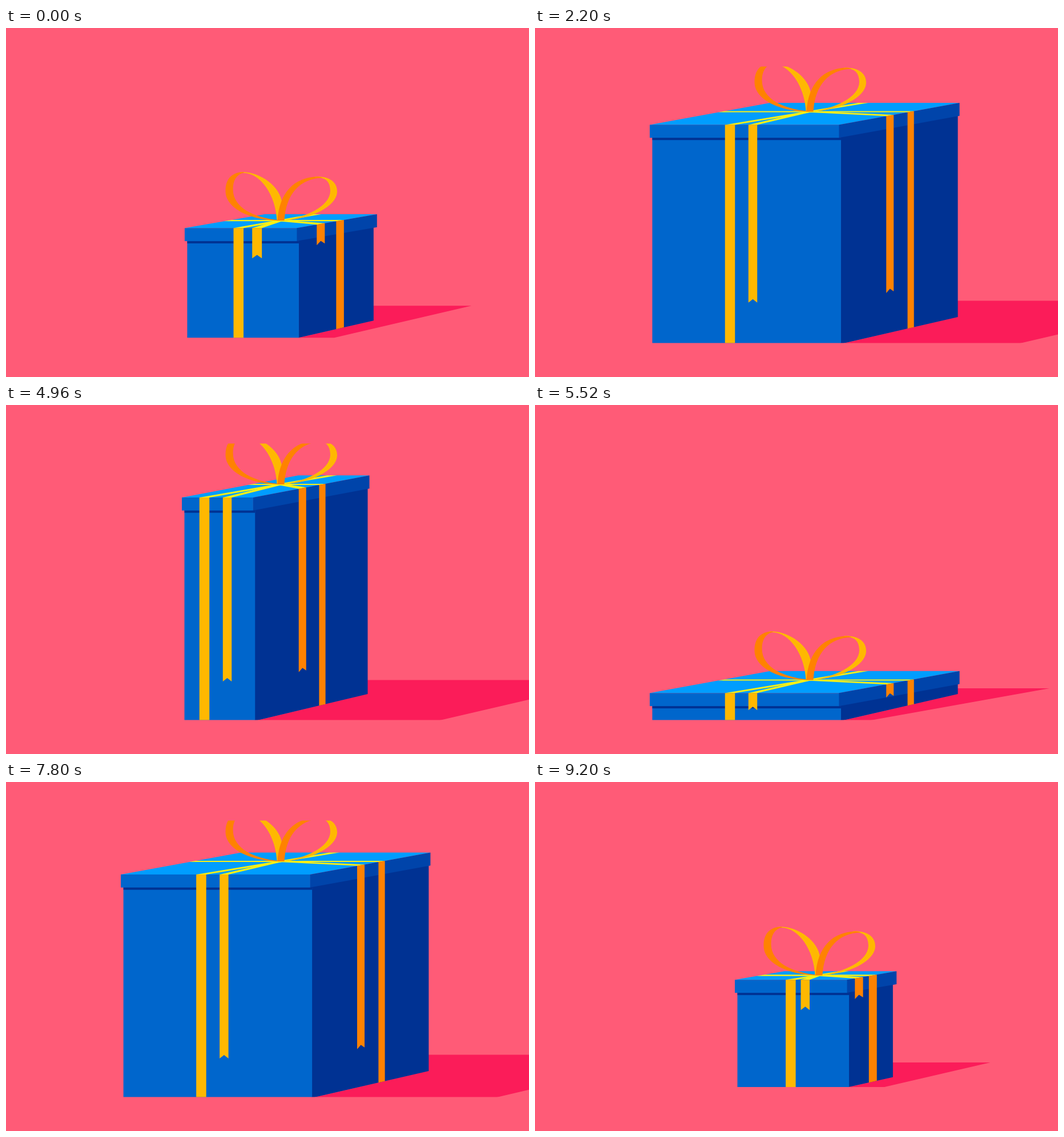
An HTML page with a canvas that plays this animation: 916x611 px, repeating every 9.24 s.

```html
<!DOCTYPE html>
<html lang="en">
<head>
<meta charset="utf-8">
<title>Gift box</title>
<style>
html, body { margin: 0; width: 100%; height: 100%; overflow: hidden; background: #ff5b77; }
canvas { display: block; width: 916px; height: 611px; }
</style>
</head>
<body>
<canvas id="stage" width="916" height="611"></canvas>
<script>
const ctx = document.getElementById('stage').getContext('2d');
const LOOP = 9240, STEP = 40;
const BG = '#ff5b77', SHADE = '#fb1c59', FRONT = '#0066cc', SIDE = '#003293',
  TOP = '#009dff', RIM = '#0044aa', GOLD = '#ffb800', ORANGE = '#ff8200', LEMON = '#f8f016';
const LID = 22.8;

// A pose is a width, a height from 0 to 9 and a depth
const WIDTH = { n: 64.5, m: 195.5, w: 330.5 };
const DEPTH = { s: 8, m: 30, d: 47 };
const poses = ('m4m m9m n9m n9d w9d w6d n0d n0s w0s w8s ' +
  'w9d n0d w0d w9s n9s n0s n9s w9d w2d w0s').split(' ')
  .map(p => [WIDTH[p[0]], +p[1], DEPTH[p[2]]]);

const clamp = u => Math.max(0, Math.min(1, u));
const ease = u => u < 0.5 ? 16 * u ** 5 : 1 - 16 * (1 - u) ** 5;
const firstStep = i => Math.floor(11.45 * i - 1.26);

// The sizes that change follow one another: width, height, depth
function poseAt(step) {
  let n = 0;
  while (n < poses.length && step >= firstStep(n + 1)) n++;
  if (n === 0) return poses[0];
  const from = poses[n - 1], to = poses[n % poses.length];
  const moves = [0, 1, 2].filter(i => from[i] !== to[i]);
  const u = (step - firstStep(n) + 1) / (moves.length < 3 ? 3 : 5);
  if (u > 1) return to;
  const pose = from.slice();
  moves.forEach((i, j) => {
    const k = moves.length > 1 ? (u - 0.52 * j / (moves.length - 1)) / 0.58 : u;
    pose[i] += (to[i] - from[i]) * ease(clamp(k));
  });
  return pose;
}

function poly(color, ...pts) {
  ctx.fillStyle = color;
  ctx.beginPath();
  pts.forEach(p => ctx.lineTo(p[0], p[1]));
  ctx.closePath();
  ctx.fill();
}

function rect(color, x0, y0, x1, y1) {
  ctx.fillStyle = color;
  ctx.fillRect(x0, y0, x1 - x0, y1 - y0);
}

const bow = [
  [GOLD, 'M-72-84.5C-40-88 0-62 3-30L0 0L-6 0C-8-45-35-83-64-83.5Z'],
  [ORANGE, 'M-64-85C-86-85-96-72-96-52C-96-20-50-1-4 0L-4-1C-45-5-83-22-83-55C-83-70-77-81-64-84Z'],
  [GOLD, 'M60-77C85-78 100-68 99.5-50C98-25 55-2 0 0C45-5 87-25 87.5-52C87-70 78-75 66-75Z'],
  [ORANGE, 'M-5 0C-2-50 25-76 65-77C68-77 72-76 74-75C35-74 10-48 7 0Z']
].map(([color, d]) => [color, new Path2D(d)]);

function drawBow(x, y) {
  ctx.save();
  ctx.translate(x, y);
  for (const [color, path] of bow) {
    ctx.fillStyle = color;
    ctx.fill(path);
  }
  ctx.restore();
}

function drawBox([W, level, D]) {
  const lift = Math.min(1, level / 4), over = Math.max(0, level - 4) / 5;
  const flat = Math.max(0, (30 - D) / 22), lean = (D / DEPTH.d) ** 4;
  const turn = (21.5 + W / 90) * lean;

  // Body
  const H = 33.5 + D * D / 145 + 38.05 * level;
  const dx = 3 + 4.29 * D + (W - WIDTH.w) / 28 * lean;
  const center = 473 + 26.5 * ((DEPTH.d - D) / 39) ** 1.5;
  const left = center - (W + dx) / 2, right = left + W, back = right + dx;
  const base = 523 + 0.64 * D;
  const floorY = x => base - D * (x - right) / dx;

  // Lid
  const top = base - H, rim = top + LID;
  const lidL = left - 4.5, lidW = W + 1, lidR = lidL + lidW;
  const lx = dx + 10 - 3.5 * lean;
  const ly = 4.5 + 0.55 * D + 0.0037 * D * D;
  const edgeY = x => top - ly * (x - lidR) / lx;

  // Shadow
  const end = right + 46 + 16 * lift + (257 - 38 * flat) * over;
  const rise = D + 10 + (12 + W / 50) * lift;
  poly(SHADE, [right, base], [end, base], [end + rise * (5.6 - 1.3 * lift), base - rise],
    [back - 2, base - rise], [back - 2, base - D]);

  poly(SIDE, [right - 0.5, base], [back, base - D], [back, top - ly + LID / 2], [right - 0.5, rim - 2]);
  rect(FRONT, left, rim, right, base);
  rect(SIDE, left, rim - 1, right, rim + 4);
  poly(TOP, [lidL, top], [lidL + lx, top - ly], [lidR + lx, top - ly], [lidR, top]);
  poly(RIM, [lidR - 0.5, top], [lidR + lx, top - ly], [lidR + lx, top - ly + LID], [lidR - 0.5, rim]);
  rect(FRONT, lidL, top, lidR, rim);

  // Left edge and width of each ribbon: front, front end, side, side end
  const fw = 17.5, fx = left + W / 2 - 4 - turn - fw / 2;
  const tw = 17 - ((D - 32) / 12) ** 2, tx = fx + 18 + 0.49 * D;
  const sw = 14 - 2.8 * lean, sx = right + dx * (0.542 + 0.055 * lean) - sw / 2;
  const uw = 14.3 - 1.3 * lean, ux = right - 13 + 1.32 * D + 1.2 * turn;
  const px = 480.5 + (24 + level / 3) * flat ** 0.85;
  const py = edgeY(sx + sw / 2);

  // Ribbons across the lid
  const bx = px + (px - fx - fw / 2) * (py - top + ly) / (top - py);
  poly(LEMON, [fx, top], [bx - fw / 2, top - ly], [bx + fw / 2, top - ly], [fx + fw, top]);
  poly(LEMON, [tx, top], [px - 7, py], [px + 6, py], [tx + tw, top]);
  poly(LEMON, [sx, edgeY(sx)], [sx + sw, edgeY(sx + sw)],
    [sx + sw - lidW, edgeY(sx + sw)], [sx - lidW, edgeY(sx)]);
  poly(LEMON, [px - 4, py + 1], [px + 6, py - 1], [ux + uw, edgeY(ux + uw)], [ux, edgeY(ux)]);

  // Ribbons down the faces
  rect(GOLD, fx, top, fx + fw, base);
  poly(ORANGE, [sx, edgeY(sx)], [sx + sw, edgeY(sx + sw)], [sx + sw, floorY(sx + sw)], [sx, floorY(sx)]);

  // Loose ends
  const ty = top + 30 + 23 * lift + 269 * over;
  poly(GOLD, [tx, top], [tx + tw, top], [tx + tw, ty], [tx + tw / 2, ty - 6], [tx, ty]);
  const uy = edgeY(ux) + 23 + 13 * lift + 285 * over;
  poly(ORANGE, [ux, edgeY(ux)], [ux + uw, edgeY(ux + uw)], [ux + uw, uy - 3],
    [ux + uw / 2, uy - 7.5], [ux, uy]);

  drawBow(px, py);
}

function frame(now) {
  rect(BG, 0, 0, 916, 611);
  ctx.save();
  ctx.beginPath();
  ctx.rect(0, 67.5, 916, 484);
  ctx.clip();
  drawBox(poseAt(Math.floor((now % LOOP) / STEP)));
  ctx.restore();
}

const start = performance.now();
function tick() {
  frame(performance.now() - start);
  requestAnimationFrame(tick);
}
tick();
</script>
</body>
</html>
```
